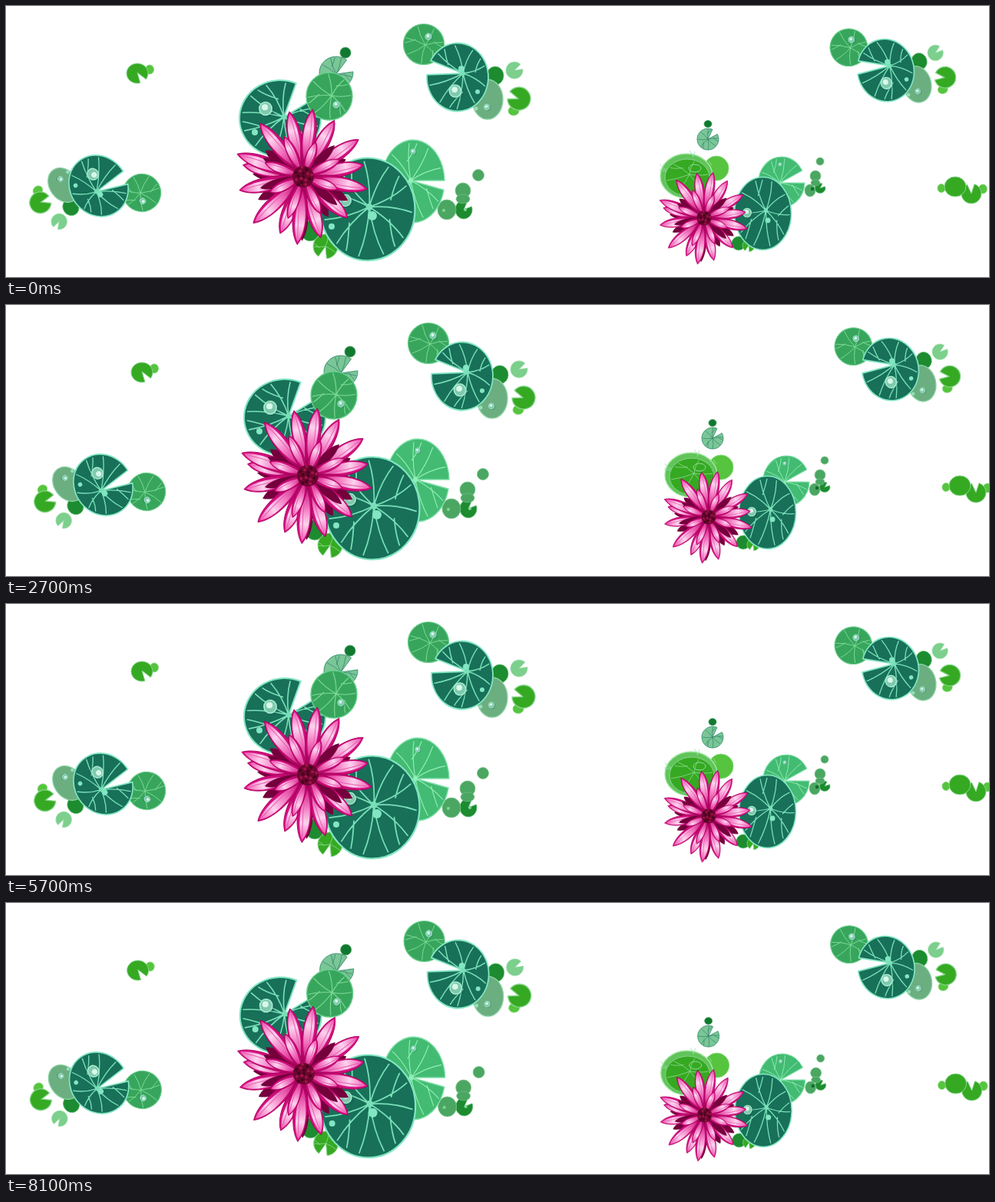
Recreate the animation shown at these times as an HTML page. Size 1280 by 354 pixels, loop 8400 ms.

```html
<!DOCTYPE html>
<html lang="en">
<head>
<meta charset="utf-8">
<title>Lily pond</title>
<style>
html, body { margin: 0; width: 100%; height: 100%; overflow: hidden; background: #fff; }
svg { display: block; width: 100%; height: 100%; }
</style>
</head>
<body>
<svg viewBox="0 0 1280 354">
  <defs>
    <linearGradient id="rim">
      <stop offset="0" stop-color="#7a0040"/>
      <stop offset=".35" stop-color="#c20a70"/>
      <stop offset="1" stop-color="#e0148c"/>
    </linearGradient>
    <linearGradient id="shine">
      <stop offset="0" stop-color="#cc1079"/>
      <stop offset=".38" stop-color="#f277c0"/>
      <stop offset=".68" stop-color="#fdd3ee"/>
      <stop offset="1" stop-color="#f060b4"/>
    </linearGradient>
  </defs>
  <g id="pond"></g>
</svg>
<script>
const NS = 'http://www.w3.org/2000/svg';
const pond = document.getElementById('pond');
const STEP = 300, STEPS = 28, SHIFT = 2 / 3;

function add(parent, tag, attrs) {
  const el = document.createElementNS(NS, tag);
  for (const key in attrs) el.setAttribute(key, attrs[key]);
  parent.appendChild(el);
  return el;
}
const group = (parent, transform) => add(parent, 'g', { transform });

const style = {
  deep:   { fill: '#187059', edge: '#82e6c2', vein: '#79dfb8' },
  mid:    { fill: '#38a55c', edge: '#69cf8c', vein: '#7cdb96' },
  mint:   { fill: '#43bb72', edge: '#7ee0a8', vein: '#92efb8' },
  sage:   { fill: '#7bc697', edge: '#3d9473', vein: '#34866b' },
  grey:   { fill: '#6bae80', edge: '#8bd3a4', vein: '#9be4bb' },
  bright: { fill: '#36a922', edge: '#86d58c', vein: '#8fdb92' },
  lime:   { fill: '#56c43e', edge: '#7ed873', vein: '#9be788' },
  dark:   { fill: '#1d8b2f', edge: '#57bd70', vein: '#57bd70' },
  pale:   { fill: '#7ccf8c', edge: '#98dfa8', vein: '#b5ecc0' },
  moss:   { fill: '#4ba662', edge: '#79c68c', vein: '#8edca0' }
};

// A leaf; notch holds the two rim angles of the cut, hub is where the veins meet.
function pad(g, x, y, rx, ry, look, { notch, hub = [0, 0], veins = 0, line = 1.4 } = {}) {
  const at = (deg, k = 1) => {
    const a = deg * Math.PI / 180;
    return [rx * k * Math.cos(a), ry * k * Math.sin(a)];
  };
  const leaf = group(g, `translate(${x} ${y})`);
  const paint = { fill: look.fill, stroke: look.edge, 'stroke-width': line, 'stroke-linejoin': 'round' };
  if (notch) {
    const [a, b] = notch;
    add(leaf, 'path', { d: `M${hub}L${at(b)}A${rx} ${ry} 0 1 1 ${at(a)}Z`, ...paint });
  } else {
    add(leaf, 'ellipse', { rx, ry, ...paint });
  }
  if (!veins) return;
  const start = notch ? notch[1] : 20;
  const span = notch ? 360 - notch[1] + notch[0] : 360;
  let d = '';
  for (let i = 0; i < veins; i++) {
    const a = start + span * (i + .5) / veins;
    const bend = i % 2 ? 10 : -10;
    const knee = at(a + bend, .5).map((v, k) => v + hub[k] * .5);
    d += `M${hub}Q${knee} ${at(a, .93)}`;
    if (i % 3 === 0) d += `M${knee}Q${at(a - bend, .72)} ${at(a - bend * 1.5, .92)}`;
  }
  add(leaf, 'path', { d, fill: 'none', stroke: look.vein, 'stroke-width': line * .8, 'stroke-linecap': 'round' });
  if (rx > 35) add(leaf, 'ellipse', { cx: hub[0], cy: hub[1], rx: rx * .07, ry: ry * .07, fill: look.vein });
}

const dot = (g, cx, cy, r, fill) => add(g, 'circle', { cx, cy, r, fill });

function drop(g, x, y, r) {
  const d = group(g, `translate(${x} ${y})`);
  add(d, 'ellipse', { cx: r * .3, cy: r * .25, rx: r, ry: r, fill: '#0d4d3f', opacity: .2 });
  add(d, 'ellipse', { rx: r * .9, ry: r * .95, fill: '#7fc9ae', stroke: '#a9edd2', 'stroke-width': r * .18 });
  add(d, 'ellipse', { cx: -r * .1, cy: -r * .2, rx: r * .45, ry: r * .45, fill: '#d8f7ea' });
}

// Outline of a petal along the x axis, bulging by up and down on its two sides.
function blade(from, to, up, down) {
  const l = to - from, c1 = from + l * .3, c2 = from + l * .78;
  return `M${from} 0C${c1} ${-up * 1.1} ${c2} ${-up * 1.5} ${to} 0C${c2} ${down * 1.5} ${c1} ${down * 1.1} ${from} 0Z`;
}

function petal(g, angle, len, half) {
  const p = group(g, `rotate(${angle})`);
  add(p, 'path', { d: blade(0, len, half, half), fill: 'url(#rim)', stroke: '#a8005c', 'stroke-width': .9 });
  add(p, 'path', { d: blade(len * .18, len * .96, half * .8, half * .6), fill: 'url(#shine)' });
  add(p, 'path', {
    d: `M${len * .25} 1Q${len * .6} 3 ${len * .92} 0`,
    fill: 'none', stroke: '#e65fb2', 'stroke-width': 1
  });
}

function flower(g, x, y, scale, turn) {
  const f = group(g, `translate(${x} ${y}) rotate(${turn}) scale(${scale})`);
  const shade = (angle, len, half) => add(f, 'path', {
    d: blade(0, len, half, half), fill: '#74003c', transform: `rotate(${angle})`
  });
  for (const [a, len] of [[28, 66], [58, 62], [91, 84], [153, 66], [183, 66], [215, 60], [-22, 60]]) shade(a, len, 8);
  const tips = [
    [191, 80], [74, 83], [-11, 80], [112, 80], [-102, 87], [-61, 84], [43, 79], [168, 85],
    [231, 90], [11, 85], [137, 89], [95, 89], [-34, 87], [-82, 89], [199, 91]
  ];
  for (const [a, len] of tips) petal(f, a, len, 9.3);
  for (const a of [40, 205, 165, -45]) shade(a, 58, 6);
  for (let i = 0; i < 8; i++) petal(f, i * 45 + 20, 48 + i % 3 * 5, 6.5);
  dot(f, 0, 0, 14, '#6c0630');
  for (let i = 0; i < 16; i++) {
    const a = i * 2.4, r = 3.2 * Math.sqrt(i);
    dot(f, r * Math.cos(a), r * Math.sin(a), 2, i % 2 ? '#a01448' : '#430519');
  }
}

function raft(x, y, scale, turn) {
  const g = group(pond, `translate(${x} ${y}) rotate(${turn}) scale(${scale})`);
  pad(g, 74, -9, 11, 11, style.pale, { notch: [-45, -8], line: .8 });
  pad(g, 73, 44, 7, 6, style.lime, { line: .8 });
  pad(g, 80, 28, 15, 15, style.bright, { notch: [178, 218], hub: [-1, 0] });
  pad(g, 49, -2, 11, 12, style.dark, { line: .8 });
  pad(g, 39, 29, 20, 26, style.grey);
  drop(g, 38, 39, 4);
  dot(g, 24, 41, 2.5, '#94dfb9');
  pad(g, -44, -43, 26.5, 26.5, style.mid, { hub: [2, 1], veins: 7, line: 1.2 });
  drop(g, -38, -53, 4.5);
  pad(g, 0, 0, 40, 44.5, style.deep, { notch: [184, 209], hub: [7, -5], veins: 9, line: 1.8 });
  drop(g, -3, 18, 8.5);
  dot(g, 5, -11, 4, '#82e6c2');
  dot(g, 26, 19, 3, '#82e6c2');
}

function leftBouquet() {
  pad(pond, 442, 61, 7, 7, { fill: '#10792f', edge: '#3e9b58' }, { line: .8 });
  pad(pond, 430, 87, 22, 21, style.sage, { notch: [-52, -3], hub: [0, 2], veins: 8, line: 1 });
  pad(pond, 357, 147, 53, 50, style.deep, { notch: [-67, -32], hub: [5, -2], veins: 11, line: 2 });
  drop(pond, 338, 134, 9);
  dot(pond, 324, 165, 4, '#82e6c2');
  pad(pond, 421, 118, 30, 31, style.mid, { hub: [3, -1], veins: 8 });
  drop(pond, 430, 129, 4.5);
  pad(pond, 615, 221, 7.5, 7.5, style.moss, { line: .8 });
  pad(pond, 595, 241, 10, 10, style.moss, { line: .8 });
  pad(pond, 596, 266, 11, 12, style.dark, { notch: [-65, -20], line: .8 });
  pad(pond, 595, 252, 9, 6, style.moss, { line: .6 });
  pad(pond, 574, 266, 12, 13, style.moss, { line: .8 });
  dot(pond, 570, 267, 2, '#7cd995');
  dot(pond, 598, 266, 2, '#7cd995');
  pad(pond, 530, 229, 41, 54, style.mint, { notch: [-1, 12], hub: [-3, -1], veins: 9 });
  drop(pond, 530, 190, 3.5);
  pad(pond, 396, 294, 12, 13, style.dark, { line: .8 });
  pad(pond, 416, 314, 16, 16, style.bright, { notch: [85, 125], veins: 3, line: 1 });
  pad(pond, 471, 265.5, 61.5, 67, style.deep, { hub: [2, -3], veins: 11, line: 2.2 });
  dot(pond, 477, 274, 6, '#82e6c2');
  dot(pond, 424, 288, 4, '#82e6c2');
  drop(pond, 442, 254, 8);
  flower(pond, 387, 223, 1, 0);
}

function rightBouquet() {
  pad(pond, 914, 154, 5, 4.5, { fill: '#10792f', edge: '#3e9b58' }, { line: .7 });
  pad(pond, 914, 174, 14, 14, style.sage, { notch: [-65, -28], veins: 7, line: .9 });
  pad(pond, 925, 212, 16, 16, style.lime, { line: 1 });
  pad(pond, 886, 222, 34, 29, { fill: '#61c45a', edge: '#a2e8a4' }, { line: 1.4 });
  pad(pond, 887, 224, 29, 24, style.bright, { hub: [3, -4], veins: 6, line: 1 });
  add(pond, 'path', {
    d: 'M852 207q3 6 9 7M890 189l5 7M897 190l-3 8M915 202l4 6M851 214l9 2',
    fill: 'none', stroke: '#9be0ae', 'stroke-width': .8
  });
  add(pond, 'ellipse', { cx: 897, cy: 212, rx: 8, ry: 5, fill: 'none', stroke: '#8ddc9e', 'stroke-width': 1 });
  pad(pond, 1060, 203, 5, 5, style.moss, { line: .7 });
  pad(pond, 1054, 222, 7, 7, style.moss, { line: .7 });
  pad(pond, 1060, 238, 7, 6.5, style.dark, { notch: [-65, -20], line: .7 });
  pad(pond, 1054, 231, 6, 4, style.moss, { line: .6 });
  pad(pond, 1047, 241, 7, 8, style.moss, { line: .7 });
  dot(pond, 1050, 239, 2.2, '#146b2c');
  pad(pond, 1010, 230, 30, 33, style.mint, { notch: [-27, 2], hub: [-2, 1], veins: 9, line: 1.1 });
  drop(pond, 1008, 207, 2.4);
  pad(pond, 954, 310, 9, 9, style.dark, { line: .8 });
  pad(pond, 967, 313, 8, 8, style.bright, { notch: [85, 125], line: .8 });
  pad(pond, 985.5, 271, 37, 47.5, style.deep, { hub: [4, -4], veins: 10, line: 1.6 });
  dot(pond, 992, 280, 3.5, '#82e6c2');
  drop(pond, 965, 270, 6);
  flower(pond, 909, 277, .685, 3);
}

function strays() {
  pad(pond, 187, 83, 5.5, 6, style.lime, { line: .8 });
  pad(pond, 171, 88, 14, 13, style.bright, { notch: [36, 74], hub: [0, -1], line: 1 });
  pad(pond, 1218, 238, 5, 5.5, style.lime, { line: .8 });
  pad(pond, 1272, 239, 5.5, 6, style.lime, { line: .8 });
  pad(pond, 1257, 245, 13, 13, style.bright, { notch: [-115, -72], line: 1 });
  pad(pond, 1236, 236, 14, 13, style.bright, { line: 1 });
}

strays();
raft(120.5, 235, .93, 144.7);
raft(588, 93, 1, 0);
raft(1145.5, 84, .92, -12.5);
leftBouquet();
rightBouquet();

// The whole pond drifts right and back in small even steps.
function draw(ms) {
  const i = Math.floor(ms / STEP) % STEPS;
  pond.setAttribute('transform', `translate(${Math.min(i, STEPS - i) * SHIFT} 0)`);
}

const begin = performance.now();
function tick() {
  draw(performance.now() - begin);
  requestAnimationFrame(tick);
}
tick();
</script>
</body>
</html>
```
